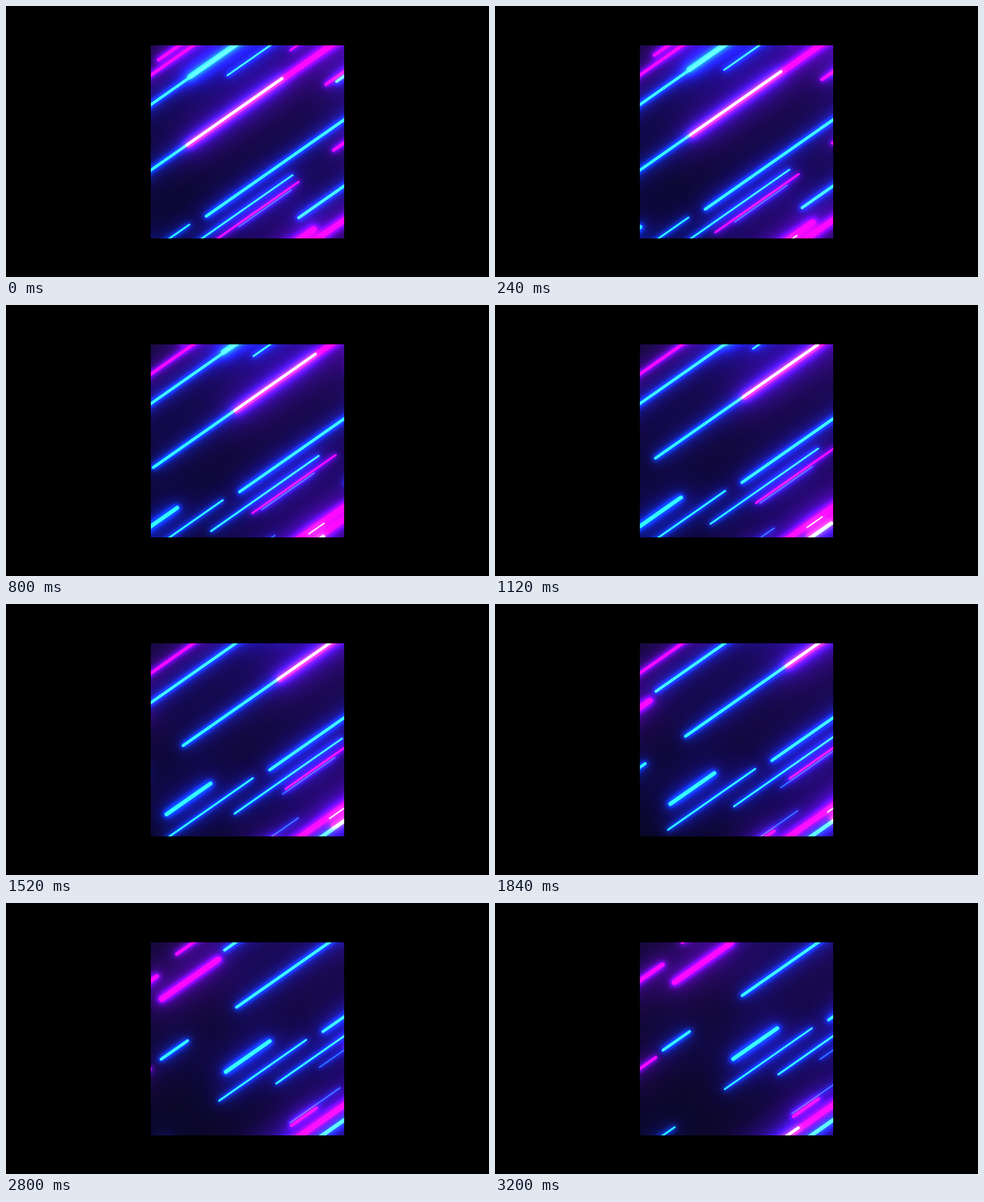
Write an HTML page with a canvas that moves like this. It is 637x358 px and loops after 3280 ms.

```html
<!DOCTYPE html>
<html lang="en">
<head>
<meta charset="utf-8">
<title>Neon streaks</title>
<style>
  html, body { margin: 0; width: 100%; height: 100%; overflow: hidden; background: #000; }
  canvas { position: absolute; left: 191px; top: 52px; }
</style>
</head>
<body>
<canvas id="view" width="255" height="255"></canvas>
<script>
const ctx = document.getElementById('view').getContext('2d');
const LEFT = 191, TOP = 52, SIZE = 255;
const LOOP = 3280, STEP = 80;
const SLOPE = Math.tan(35 * Math.PI / 180);
const AWAY = 3000;

// Horizontal speeds in px/s, line widths and the length of beams that run off the edge
const CRAWL = 38, SLOW = 43, CRUISE = 55, BRISK = 61, FAST = 79;
const THIN = 1.9, FINE = 2.6, MID = 4, BOLD = 5.6, FAT = 7.5;
const LONG = 330;

const cyan = { core: 'rgb(35,225,255)', near: 'rgb(0,85,255)', halo: 'rgb(0,45,185)', far: 'rgb(18,14,150)' };
const pink = { core: 'rgb(255,0,240)', near: 'rgb(130,0,200)', halo: 'rgb(70,0,120)', far: 'rgb(60,0,115)' };
const blue = { core: 'rgb(20,95,235)', near: 'rgb(0,45,190)', halo: 'rgb(0,25,110)', far: 'rgb(12,12,120)' };

// lane: y where the beam crosses x = 300; tail: x of its lower end at the start
const beams = [];
function beam(color, width, speed, lane, tail, length = LONG) {
  beams.push({ color, width, speed, lane, tail, length });
}

// Crossing pair that turns white where it overlaps
beam(cyan, MID, CRUISE, 140.5, 150, 214);
beam(pink, FAT, FAST, 142, 241);

// Upper left
beam(cyan, MID, FAST, 54, 67);
beam(cyan, FAT, CRUISE, 53, 243);
beam(cyan, FINE, SLOW, 86, 292);
beam(pink, MID, CRUISE, 15, 71);
beam(pink, MID, CRAWL, 2, 201);
beam(pink, FAT, FAST, 60.5, -16, 75);
beam(pink, BOLD, CRUISE, 26, -285);

// Right edge
beam(pink, FINE, CRUISE, 111, 375);
beam(pink, MID, CRAWL, 189, 422);
beam(cyan, MID, CRUISE, 195, 436);
beam(pink, MID, CRUISE, 283, 432);

// Middle and lower left
beam(cyan, MID, CRUISE, 252.5, 264);
beam(cyan, FINE, SLOW, 278, 236, 142);
beam(pink, FINE, BRISK, 292.5, 276, 110);
beam(blue, THIN, CRAWL, 296.5, 307, 69);
beam(cyan, FINE, CRUISE, 248, 127, 115);
beam(cyan, BOLD, BRISK, 216, 119, 58);
beam(cyan, MID, SLOW, 139.5, 84, 35);
beam(pink, MID, CRUISE, 142.5, -294);
beam(cyan, FINE, CRUISE, 252, 19, 42);

// Lower right corner
beam(cyan, MID, FAST, 340, 386);
beam(pink, FAT, CRUISE, 369, 76);
beam(pink, FAT, SLOW, 385, 367);
beam(cyan, BOLD, FAST, 389, 25);
beam(cyan, THIN, CRAWL, 372, 369, 20);
beam(blue, THIN, SLOW, 342.5, 254, 66);
beam(pink, MID, SLOW, 347.5, 256, 33);
beam(cyan, MID, CRUISE, 367, -106);

const base = ctx.createLinearGradient(0, SIZE, SIZE, 0);
base.addColorStop(0, 'rgb(9,7,34)');
base.addColorStop(1, 'rgb(26,9,68)');

function stroke(b, t, width, shift) {
  const x1 = b.tail + b.speed * t, x2 = x1 + b.length;
  const y = x => b.lane - (x - 300) * SLOPE - TOP;
  ctx.lineWidth = width;
  ctx.beginPath();
  ctx.moveTo(x1 - LEFT - shift, y(x1));
  ctx.lineTo(x2 - LEFT - shift, y(x2));
  ctx.stroke();
}

// Only the blurred shadow lands on the canvas
function glow(b, t, width, sigma, color) {
  ctx.shadowColor = color;
  ctx.shadowBlur = sigma * 2;
  ctx.shadowOffsetX = AWAY;
  ctx.strokeStyle = '#000';
  stroke(b, t, width, AWAY);
  ctx.shadowColor = 'transparent';
  ctx.shadowBlur = ctx.shadowOffsetX = 0;
}

function draw(t) {
  ctx.globalCompositeOperation = 'source-over';
  ctx.fillStyle = base;
  ctx.fillRect(0, 0, SIZE, SIZE);
  ctx.globalCompositeOperation = 'lighter';
  ctx.lineCap = 'round';
  for (const b of beams) {
    const { color, width } = b;
    glow(b, t, width * 4, 25, color.far);
    glow(b, t, width * 2, 9, color.halo);
    glow(b, t, width * 1.5, 3, color.near);
    ctx.strokeStyle = color.core;
    stroke(b, t, width * 0.9, 0);
  }
}

const start = performance.now();
let shown = -1;
function frame() {
  const step = Math.floor((performance.now() - start) % LOOP / STEP);
  if (step !== shown) {
    shown = step;
    draw(step * STEP / 1000);
  }
  requestAnimationFrame(frame);
}
frame();
</script>
</body>
</html>
```
